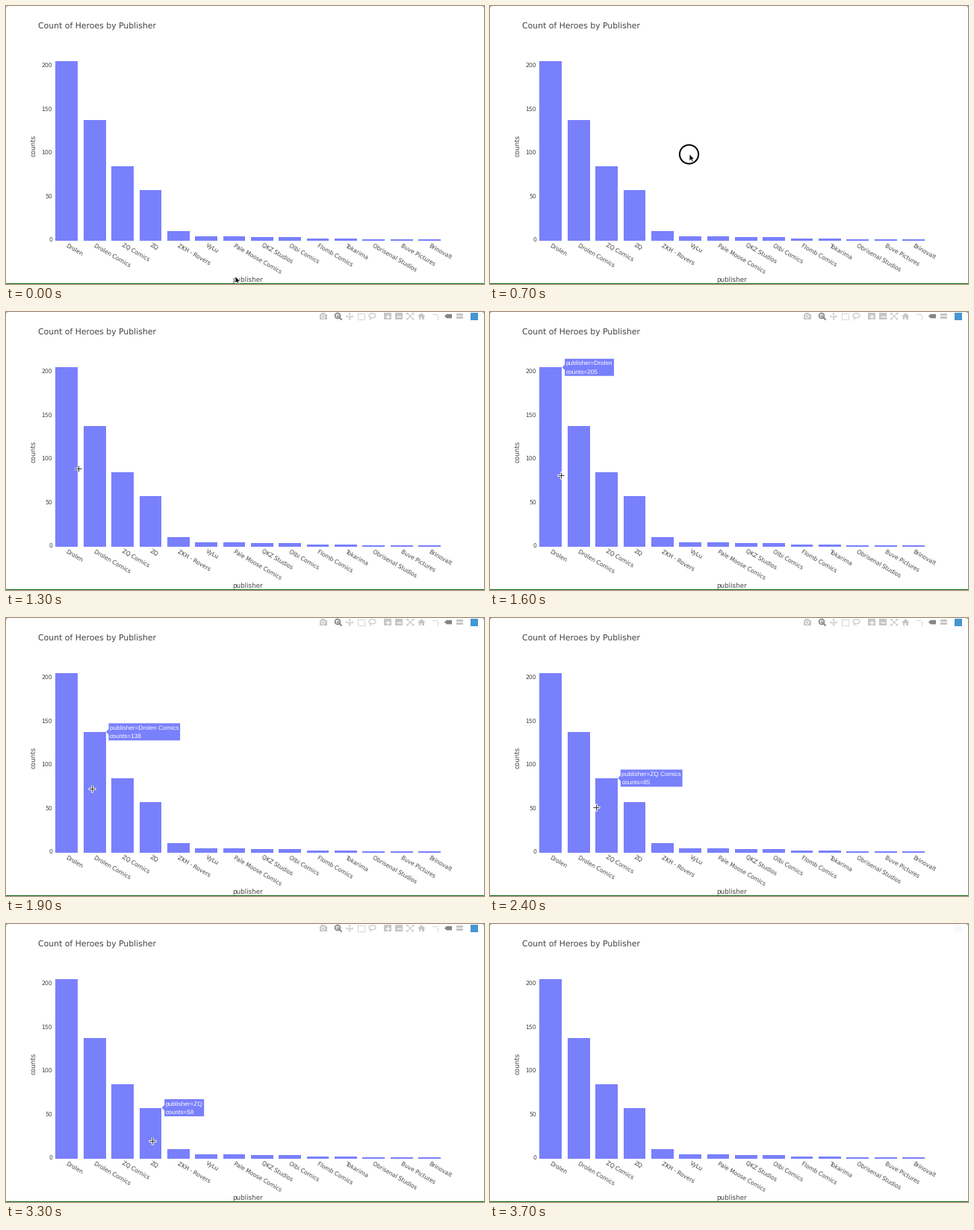
These frames come from a looping animation (640x373 px, 4200 ms). A matplotlib script:

```python
import matplotlib.pyplot as plt
import numpy as np
from matplotlib.animation import FuncAnimation
from matplotlib.patches import Circle, Ellipse, Polygon, Rectangle

W, H, DPI = 640, 373, 64
PT = 72 / DPI                      # points per pixel
STEP, FRAMES = 100, 42

plt.rcParams.update({"font.family": "DejaVu Sans", "text.hinting": "none",
                     "toolbar": "None"})

BAR = "#7980fc"
INK = "#444444"
ICON, ICON_ON = "#c6c6c6", "#858585"

DATA = [("Drolen", 205), ("Drolen Comics", 138), ("ZQ Comics", 85), ("ZQ", 58),
        ("ZKH - Rovers", 11), ("VyLu", 5), ("Pale Moose Comics", 5),
        ("QKZ Studios", 4), ("Olbi Comics", 4), ("Flomb Comics", 2),
        ("Tokarima", 2), ("Obrisenal Studios", 1), ("Buve Pictures", 1),
        ("Brinovalt", 1)]
FIRST, PITCH, HALF = 81.4, 37.35, 14.94
BASE, UNIT = 314.5, 1.172

# Pointer path: time in ms, x, y
PATH = np.array([
    (0, 307, 362.5), (100, 299, 325), (200, 276, 230), (300, 267, 198.5),
    (800, 267, 198.5), (900, 235, 201), (1000, 170, 206), (1100, 117, 209),
    (1200, 97, 210), (1300, 96.5, 210), (1400, 90, 212), (1500, 89, 214),
    (1600, 95, 219), (1700, 108, 226), (1800, 115, 228.5), (2000, 115, 228.5),
    (2100, 118, 231), (2200, 125, 237), (2300, 134, 246), (2400, 142, 254),
    (2500, 148, 260), (2600, 150, 261.5), (2900, 155, 262.5),
    (3000, 163, 268), (3100, 181, 280), (3200, 194, 289),
    (3300, 196, 290.5), (3400, 203, 312)])
CLICK, FOCUS, LEAVE = 700, 800, 3500

fig = plt.figure(figsize=(W / DPI, H / DPI), dpi=DPI, facecolor="white")
ax = fig.add_axes([0, 0, 1, 1])
ax.set(xlim=(0, W), ylim=(H, 0))
ax.axis("off")


def bar_x(i):
    return FIRST + i * PITCH


def bar_y(value):
    return BASE - value * UNIT


def add(patch):
    return ax.add_patch(patch)


def rect(x0, y0, x1, y1, color, z=2):
    return add(Rectangle((x0, y0), x1 - x0, y1 - y0, fc=color, lw=0, zorder=z))


def poly(points, color, z=2):
    return add(Polygon(points, closed=True, fc=color, lw=0, zorder=z))


def stroke(xs, ys, color, width=1.0, z=2, **kw):
    return ax.plot(xs, ys, color=color, lw=width * PT, zorder=z,
                   solid_capstyle="butt", **kw)[0]


def label(x, y, text, px, color=INK, z=2, **kw):
    return ax.text(x, y, text, fontsize=px * PT, color=color, zorder=z,
                   va="baseline", **kw)


def draw_chart():
    label(43, 29.3, "Count of Heroes by Publisher", 10.85)
    label(324, 369.8, "publisher", 8.8, ha="center")
    label(39, 187.5, "counts", 8.8, ha="left", rotation=90,
          rotation_mode="anchor").set_y(202.2)
    for tick in range(0, 201, 50):
        label(62.2, bar_y(tick) + 2.8, str(tick), 7.65, ha="right")
    for i, (name, value) in enumerate(DATA):
        x = bar_x(i)
        rect(x - HALF, bar_y(value), x + HALF, BASE, BAR)
        label(x - 1.7, 322.6, name, 7.6, ha="left", rotation=-30,
              rotation_mode="anchor")
    rect(0, 371.6, W, H, "#0c6a14")
    for x, d in ((0, 2), (W, -2)):
        poly([(x, 0), (x + d, 0), (x, 2)], "#9a9a9a")


def draw_toolbar():
    parts = [
        # camera
        rect(419.5, 2.5, 429.5, 9.7, ICON), rect(422, 1.2, 427, 2.6, ICON),
        add(Circle((424.5, 6), 2.7, fc="white", lw=0, zorder=3)),
        add(Circle((424.5, 6), 1.6, fc=ICON, lw=0, zorder=4)),
        # magnifier
        add(Circle((444, 5), 3.4, fill=False, ec=ICON_ON, lw=1.7 * PT)),
        stroke([446.3, 449.6], [7.3, 10.6], ICON_ON, 2),
        stroke([442, 446], [5, 5], ICON_ON), stroke([444, 444], [3, 7], ICON_ON),
        # pan
        stroke([456, 464], [5.8, 5.8], ICON), stroke([460, 460], [1.8, 9.8], ICON),
        # box select
        stroke([471, 480, 480, 471, 471], [1.5, 1.5, 10.2, 10.2, 1.5], ICON, 1.1,
               dashes=(1.6, 0.9)),
        # lasso
        add(Ellipse((490.5, 4.8), 9, 6, fill=False, ec=ICON, lw=1.2 * PT)),
        stroke([487.2, 488.4, 487.4], [6.8, 8.6, 10.6], ICON, 1.2),
        # zoom in, zoom out
        rect(506, 1, 515.6, 10.4, ICON), rect(521, 1, 530.6, 10.4, ICON),
        stroke([508, 513.6], [5.7, 5.7], "white", 1.4, 3),
        stroke([510.8, 510.8], [2.9, 8.5], "white", 1.4, 3),
        stroke([523, 528.6], [5.7, 5.7], "white", 1.4, 3),
        # autoscale
        stroke([537.5, 545], [2, 9.5], ICON), stroke([537.5, 545], [9.5, 2], ICON),
        # home
        poly([(551, 6), (556.3, 1.2), (561.6, 6)], ICON),
        rect(552.6, 6, 555.2, 10.3, ICON), rect(557.4, 6, 560, 10.3, ICON),
        rect(552.6, 5.5, 560, 7.4, ICON),
        # spike lines
        stroke([571, 578], [3, 3], ICON, 1.2, dashes=(1.8, 0.9)),
        stroke([577.5, 577.5], [4.5, 10], ICON, 1.2, dashes=(1.8, 0.9)),
        # hover modes
        poly([(587, 5.6), (590, 2.8), (597, 2.8), (597, 8.4), (590, 8.4)], ICON_ON),
        rect(602.5, 2, 612, 4.9, ICON), rect(602.5, 6.3, 612, 9.2, ICON),
    ]
    for dx, dy in ((1, 0), (-1, 0), (0, 1), (0, -1)):
        tip = np.array([460 + 5 * dx, 5.8 + 5 * dy])
        back = tip - 2 * np.array([dx, dy])
        side = 1.8 * np.array([dy, dx])
        parts.append(poly([tip, back + side, back - side], ICON))
    for sx in (-1, 1):
        for sy in (-1, 1):
            cx, cy = 541.2 + 5 * sx, 5.7 + 4.7 * sy
            parts.append(poly([(cx, cy), (cx - 3 * sx, cy), (cx, cy - 3 * sy)], ICON))
    return parts


def draw_hover(i):
    name, value = DATA[i]
    edge, y = bar_x(i) + HALF, bar_y(value)
    left = edge + 3.8
    lines = [label(left + 1.4, y + dy, text, 8.25, "white", 6,
                   family="Liberation Sans")
             for dy, text in ((-2.5, f"publisher={name}"), (8.2, f"counts={value}"))]
    right = max(t.get_window_extent().x1 for t in lines) + 1.8
    box = poly([(edge + 0.3, y), (left, y - 3.8), (left, y - 11.5),
                (right, y - 11.5), (right, y + 11.5), (left, y + 11.5),
                (left, y + 3.8)], BAR, 5)
    return lines + [box]


draw_chart()
toolbar = draw_toolbar()
badge = rect(622, 0.8, 632.3, 10.8, "#4596d2")
hovers = [draw_hover(i) for i in range(4)]

ARROW = np.array([(0, 0), (0, 9.6), (2.2, 7.6), (3.8, 11.2), (5.3, 10.5),
                  (3.8, 7.1), (6.8, 7)])
arrow = add(Polygon(ARROW, closed=True, fc="black", ec="white", lw=0.8 * PT, zorder=9))
ring = add(Circle((266.5, 199), 12.6, fill=False, ec="black", lw=2 * PT, zorder=8))
cross = [stroke([], [], color, width, 9 + k)
         for k, (color, width) in enumerate((("white", 2.8), ("white", 2.8),
                                             ("#333333", 1), ("#333333", 1)))]


def toolbar_alpha(t):
    return np.interp(t, [700, 800, 900, 1000, 3400, 3500, 3600, 3700],
                     [0, 0.35, 0.8, 1, 1, 0.65, 0.2, 0])


def update(frame):
    t = frame * STEP
    x = np.interp(t, PATH[:, 0], PATH[:, 1])
    y = np.interp(t, PATH[:, 0], PATH[:, 2])
    focused = FOCUS <= t < LEAVE

    arrow.set_xy(ARROW + (x, y))
    arrow.set_visible(t < FOCUS)
    ring.set_visible(CLICK <= t <= FOCUS)
    for k, line in enumerate(cross):
        reach = 5 if k < 2 else 4.3
        if k % 2:
            line.set_data([x, x], [y - reach, y + reach])
        else:
            line.set_data([x - reach, x + reach], [y, y])
        line.set_visible(focused)

    for i, parts in enumerate(hovers):
        inside = abs(x - bar_x(i)) < HALF and bar_y(DATA[i][1]) < y < BASE
        for part in parts:
            part.set_visible(focused and inside)

    alpha = toolbar_alpha(t)
    for part in toolbar:
        part.set_alpha(alpha)
    badge.set_alpha(max(alpha, 0.04 if t >= LEAVE else 0))


anim = FuncAnimation(fig, update, frames=FRAMES, interval=STEP, repeat=True,
                     repeat_delay=0, init_func=lambda: update(0))
plt.show()
```
